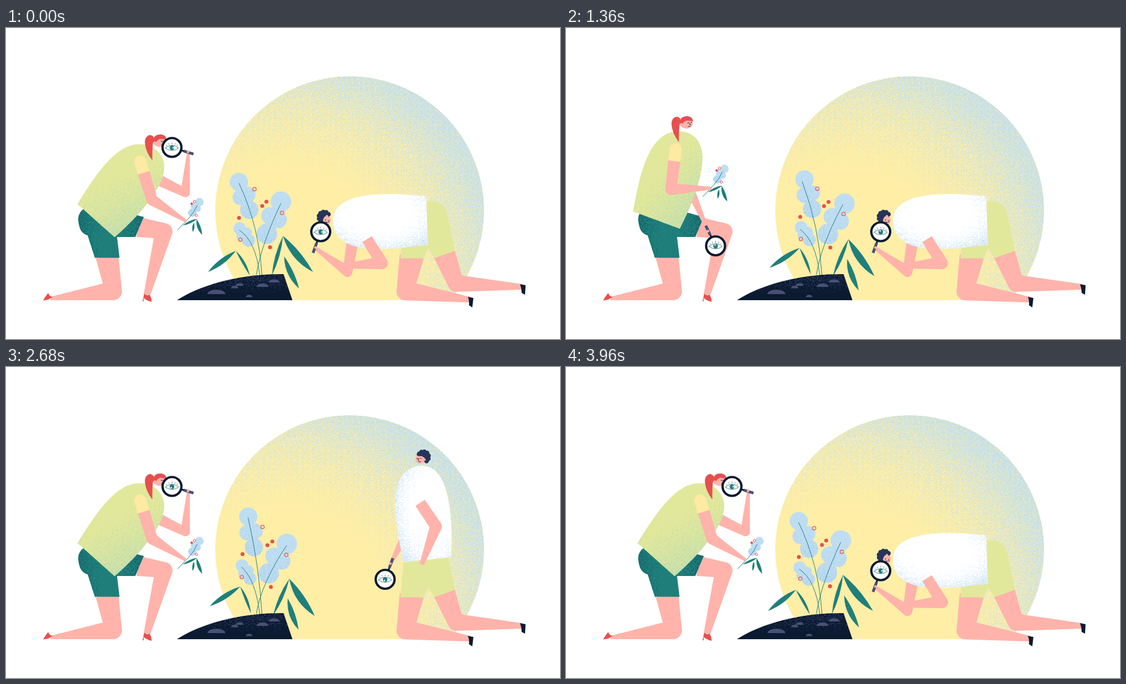
Animation of 998x561 px, one loop 4 s. Source, as an HTML page:

```html
<!DOCTYPE html>
<html lang="en">
<head>
<meta charset="utf-8">
<title>Field study</title>
<style>
html, body { margin: 0; width: 100%; height: 100%; overflow: hidden; background: #fff; }
svg { position: absolute; left: 0; top: 0; width: 100%; height: 100%; display: block; }
#back { will-change: transform; }
</style>
</head>
<body>
<svg id="back" viewBox="0 0 998 561"><defs id="defs"></defs></svg>
<svg id="stage" viewBox="0 0 998 561"></svg>
<script>
const NS = 'http://www.w3.org/2000/svg';
const SKIN = '#ffb3ab', TEAL = '#1f7f7b', NAVY = '#0a1a30', RED = '#e74f4f';
const LIME = '#e2e89b', PALE = '#c0def2', SLATE = '#4a5075', HAIR = '#26345a';
const $ = id => document.getElementById(id);
const back = $('back'), stage = $('stage'), defs = $('defs');

// Vectors
const plus = (a, b, k = 1) => [a[0] + b[0] * k, a[1] + b[1] * k];
const lerp = (a, b, p) => [a[0] + (b[0] - a[0]) * p, a[1] + (b[1] - a[1]) * p];
const unit = (a, b) => {
  const d = Math.hypot(b[0] - a[0], b[1] - a[1]) || 1;
  return [(b[0] - a[0]) / d, (b[1] - a[1]) / d];
};
const turn = ([x, y], k = 1) => [-y * k, x * k];
const polar = deg => [Math.cos(deg * Math.PI / 180), Math.sin(deg * Math.PI / 180)];
const spin = ([x, y], [cx, cy], deg) => {
  const [c, s] = polar(deg);
  return [cx + (x - cx) * c - (y - cy) * s, cy + (x - cx) * s + (y - cy) * c];
};
// Straight move bowed sideways, furthest off halfway
const swing = (a, b, bow, p) => plus(lerp(a, b, p), bow, 4 * p * (1 - p));
const xy = ([x, y]) => x.toFixed(2) + ' ' + y.toFixed(2);

// Drawing
function add(parent, tag, attrs = {}, html = '') {
  const el = document.createElementNS(NS, tag);
  for (const k in attrs) el.setAttribute(k, attrs[k]);
  if (html) el.innerHTML = html;
  parent.appendChild(el);
  return el;
}
const group = (parent = stage) => add(parent, 'g');
const path = (parent, d, fill, more) => add(parent, 'path', { d, fill, ...more });
const stroke = (parent, d, color, width) =>
  path(parent, d, 'none', { stroke: color, 'stroke-width': width, 'stroke-linecap': 'round' });
const disc = ([x, y], r) => `M${xy([x - r, y])}a${r} ${r} 0 1 0 ${2 * r} 0a${r} ${r} 0 1 0 ${-2 * r} 0Z`;
const setPath = (d, ...els) => els.forEach(el => el.setAttribute('d', d));
const place = (el, p) => el.setAttribute('transform', `translate(${xy(p)})`);
const rotate = (el, deg, pivot) => el.setAttribute('transform', `rotate(${deg.toFixed(2)} ${xy(pivot)})`);

// Speckle: gradient alpha plus noise, cut and filled with one colour
function speckle(name, color, tag, attrs, stops) {
  add(defs, tag, { id: name, ...attrs }, stops.map(([o, a]) =>
    `<stop offset="${o}" stop-opacity="${a}"/>`).join(''));
  add(defs, 'filter', { id: name + 'Grain', x: 0, y: 0, width: 1, height: 1, 'color-interpolation-filters': 'sRGB' }, `
    <feTurbulence type="fractalNoise" baseFrequency=".9" numOctaves="2" seed="4"/>
    <feColorMatrix values="0 0 0 0 0  0 0 0 0 0  0 0 0 0 0  3 0 0 0 -1" result="n"/>
    <feComposite in="SourceGraphic" in2="n" operator="arithmetic" k2="1" k3="1" k4="-1"/>
    <feComponentTransfer result="m"><feFuncA type="linear" slope="3"/></feComponentTransfer>
    <feFlood flood-color="${color}"/>
    <feComposite in2="m" operator="in"/>`);
}
function grainy(parent, d, fill, name) {
  return [path(parent, d, fill), path(parent, d, `url(#${name})`, { filter: `url(#${name}Grain)` })];
}
const down = { x1: 0, y1: 0, x2: 0, y2: 1 };
speckle('sky', '#c3dfec', 'radialGradient',
  { gradientUnits: 'userSpaceOnUse', cx: 500, cy: 440, r: 430 }, [[.42, 0], [.7, .5], [.92, 1]]);
speckle('rock', '#414874', 'linearGradient', down, [[0, .45], [.35, .3], [.85, 0]]);
speckle('blouse', '#bddcb0', 'linearGradient', { x1: .2, y1: .2, x2: .8, y2: 1 }, [[0, 0], [.3, .15], [1, 1]]);
speckle('pants', '#0f5760', 'linearGradient', { x1: 0, y1: 0, x2: 1, y2: 0 }, [[0, .55], [.4, .05], [.6, .1], [1, .6]]);
speckle('tee', '#c6e0f4', 'radialGradient', { cx: .65, cy: .45, r: .7 }, [[.45, 0], [.75, .3], [1, .8]]);
speckle('petal', '#a4cbe8', 'linearGradient', down, [[0, .05], [.5, .25], [1, .55]]);

// Bent limb: flat ends, round outer joint. Sizes are half widths
function limb(s, e, h, [top, joint, end]) {
  const u = unit(s, e), v = unit(e, h);
  const side = u[0] * v[1] - u[1] * v[0] > 0 ? 1 : -1;
  const n = turn(u, side), m = turn(v, side);
  const mid = unit([0, 0], plus(n, m));
  const reach = Math.min(2.2, 1 / (mid[0] * n[0] + mid[1] * n[1]));
  const line = [plus(s, n, top), plus(e, mid, joint * reach), plus(h, m, end), plus(h, m, -end), plus(e, m, -joint)];
  return `M${line.map(xy).join('L')}A${joint} ${joint} 0 0 ${side > 0 ? 0 : 1} ${xy(plus(e, n, -joint))}L${xy(plus(s, n, -top))}Z`;
}
const UPPER = 51.5, FORE = 73;
function elbow(s, h, side) {
  const u = unit(s, h);
  const d = Math.min(Math.hypot(h[0] - s[0], h[1] - s[1]), UPPER + FORE);
  const a = (UPPER ** 2 - FORE ** 2 + d * d) / (2 * d);
  return plus(plus(s, u, a), turn(u, side), Math.sqrt(Math.max(0, UPPER ** 2 - a * a)));
}
const arm = (s, h, side, size) => limb(s, elbow(s, h, side), h, size);

function leaf(a, b, width, bend = 0) {
  const n = turn(unit(a, b)), mid = lerp(a, b, .5);
  return `M${xy(a)}Q${xy(plus(mid, n, bend + width))} ${xy(b)}Q${xy(plus(mid, n, bend - width))} ${xy(a)}Z`;
}
// Petals: one round at each end, a pair side by side between
function petals(a, b, r) {
  const n = turn(unit(a, b)), mid = lerp(a, b, .5), small = r * .84;
  return disc(a, r) + disc(b, r) + disc(plus(mid, n, r * .45), small) + disc(plus(mid, n, -r * .45), small);
}

// Sun
const sun = 'M439 491A242 242 0 1 1 799 491Z';
grainy(back, sun, '#feeea6', 'sky');

// Plant: stems bend more the higher they are, leaves tip from the root
const updates = [];
const ROOT = [458, 445];
const sway = (t, low) => (1 - Math.cos((t - low) / 1000 * Math.PI)) / 2;
const bend = ([x, y], s) => {
  const k = .0007 * (ROOT[1] - y) * s;
  return [x + k * (ROOT[1] - y), y + 2 * k * (x - ROOT[0])];
};
const tip = ([x, y], s) => {
  const h = ROOT[1] - y;
  return [x + (3 + .16 * h) * s, y + (.11 + .0015 * h) * (x - ROOT[0]) * s];
};
function flower(a, b, r, foot, knee) {
  const els = grainy(stage, '', PALE, 'petal');
  const stem = stroke(stage, '', TEAL, 1);
  const head = plus(a, [-1, 3]);
  updates.push(t => {
    const s = sway(t, 1890), q = sway(t, 1800);
    setPath(petals(bend(a, s), bend(b, s), r), ...els);
    setPath(`M${xy(foot)}Q${xy(knee)} ${xy(bend(head, q))}`, stem);
  });
}
function berry(at, hollow) {
  const el = hollow ? stroke(stage, disc([0, 0], 3.2), RED, 1.2) : path(stage, disc([0, 0], 3.5), RED);
  updates.push(t => place(el, bend(at, sway(t, 1800))));
}
function frond(a, b, width, curve) {
  const el = path(stage, '', TEAL);
  updates.push(t => {
    const s = sway(t, 1980);
    setPath(leaf(tip(a, s), tip(b, s), width, curve), el);
  });
}
flower([419, 278], [438, 328], 16.5, [461, 445], [456, 358]);
flower([495, 313], [470, 371], 18.5, [451, 445], [460, 390]);
flower([421, 362], [437, 383], 11.5, [457, 445], [450, 384]);
[[446, 291], [496.5, 333], [422, 382]].forEach(p => berry(p, true));
[[468, 313], [460.5, 321], [419, 343], [475.5, 395.5]].forEach(p => berry(p));
frond([414, 402], [364, 440], 9);
frond([414, 402], [439, 446], 5, -3);
frond([499, 375], [553, 440], 13, 5);
frond([499, 375], [479, 446], 7);
frond([501, 412], [528, 470], 10, 4);

// Rock
grainy(stage, 'M308 491C346 466 416 443 500 444L516 491Z', NAVY, 'rock');
for (const [x, y, r] of [[379, 480, 16], [412, 469.5, 6.5], [421, 465, 7], [462, 467, 11], [438, 485.5, 6], [483, 459, 10]])
  path(stage, `M${x - r} ${y}A${r} ${2 + r * .38} 0 0 1 ${x + r} ${y}Z`, SLATE);

function glass() {
  const g = group();
  const handle = add(g, 'g', {}, `
    <path d="M18 0H24" stroke="${NAVY}" stroke-width="3"/>
    <path d="M22 0H40.5" stroke="${SLATE}" stroke-width="5"/>
    <ellipse cx="30" cy="-1" rx="2.2" ry="2.6" fill="${SKIN}"/>`);
  add(g, 'circle', { r: 17, fill: '#fff', stroke: NAVY, 'stroke-width': 4.2 });
  stroke(g, 'M-12 1Q0-9 12 1Q0 10-12 1Z', '#3e6e7c', .9);
  for (let a = -150; a <= -30; a += 30) {
    const [x, y] = polar(a);
    stroke(g, `M${xy([x * 10, y * 6])}L${xy([x * 12, y * 8.5])}`, '#3e6e7c', .8);
  }
  path(g, disc([0, .5], 4.2), TEAL);
  const glint = path(g, disc([0, 0], 1.4), '#fff');
  return (at, deg, t) => {
    place(g, at);
    rotate(handle, deg, [0, 0]);
    place(glint, plus([0, .5], polar(t * .18), 2.3));
  };
}
const grip = (at, deg) => plus(at, polar(deg), 31);

// Woman
function woman() {
  const HIP = [160, 345];
  path(stage, limb([182, 412], [193, 475], [80, 488], [20.5, 16, 3]), SKIN);
  path(stage, 'M67 491.500L70 486L76 478Q78 484 84 485L76 490Z', RED);
  path(stage, limb([238, 359], [285, 367], [254, 481], [18, 15, 6]), SKIN);
  path(stage, 'M249 479Q254 484 258 481Q263 487 262 494Q254 492 248 487V493H246Z', RED);
  grainy(stage, 'M140 326Q127 336 131 353Q134 371 147 374L160 414.500H204.500L200 377H233L248 341L190 325Z', TEAL, 'pants');
  const far = path(stage, '', SKIN), torso = group();
  grainy(torso, 'M121 331C133 260 150 187 203 186C233 187 246 208 246 237Q244 285 205 362Z', LIME, 'blouse');

  const sprig = group();
  grainy(sprig, petals([22, -34], [9, -15], 7.5), PALE, 'petal');
  stroke(sprig, 'M-17 16L2-4Q13-16 18-28M-4 6Q6-2 17-3', TEAL, 1);
  path(sprig, leaf([17, -3], [-8, 8], 4) + leaf([17, -3], [27, 25], 6, 2) + leaf([12, 3], [10, 20], 4), TEAL);
  path(sprig, disc([8, -31], 2.2), RED);
  stroke(sprig, disc([13, -35], 2.2) + disc([16.5, -10], 2.2), RED, 1);

  const near = path(stage, '', SKIN), sleeve = path(stage, '', '#feeaa2'), head = group();
  add(head, 'ellipse', { cy: 2, rx: 11.5, ry: 9.5, fill: SKIN });
  path(head, 'M-12 3Q-13-11 2-11Q11-10 12-2L1-3Q-6-2-8 7Q-12 6-12 3ZM-27 3Q-27-8-18-10Q-11-9-11-4Q-14 8-13.500 36Q-26 20-27 3Z', RED);
  path(head, disc([-9, 4], 2.5), SKIN);
  stroke(head, 'M2 1.500L5 1M8 .5L10 0M6 2L7.500 4.500H5.500M3 7.500Q5 8.500 7 7.500', NAVY, .9);
  const lens = glass();

  // p: 0 leaning, 1 upright
  return (p, t) => {
    const tilt = 21.5 * (1 - p);
    rotate(torso, tilt, HIP);
    place(head, spin([217, 170], HIP, tilt));
    const at = swing([299, 215.5], [269.5, 393], [86, -34], p), deg = 17 + 227 * p;
    lens(at, deg, t);
    setPath(arm(lerp([277, 275], [203, 246], p), grip(at, deg), 1, [10, 8, 2.5]), far);

    const s = lerp([248, 261], [195, 240], p), h = lerp([325, 349], [262, 289], p);
    setPath(arm(s, h, 1, [11, 10, 2.5]), near);
    const u = unit(s, elbow(s, h, 1)), n = turn(u), top = plus(s, u, -21);
    setPath(`M${xy(plus(s, n, 11))}L${xy(plus(top, n, 11))}A11 11 0 0 1 ${xy(plus(top, n, -11))}L${xy(plus(s, n, -11))}Z`, sleeve);
    place(sprig, plus(h, [1.5, -1]));
  };
}

// Man
function man() {
  const HIP = [758.5, 347.5];
  path(stage, limb([789, 406], [811, 461], [929, 467], [20, 15, 5]), SKIN);
  path(stage, 'M926 462L936 464L935 481L929 478Q929 470 926 462Z', NAVY);
  path(stage, limb([731, 412], [720, 475], [835, 490], [22, 16.5, 5]), SKIN);
  path(stage, 'M832 485L842 487L840 504L834 500Q835 492 832 485Z', NAVY);
  path(stage, 'M716 352L757 314Q791 308 797 343L808.500 402L772 415L761 398L752 415.500H710.500Z', LIME);
  const far = path(stage, '', SKIN), torso = group();
  grainy(torso, 'M802 343C805 270 800 180 750 178C715 178 701 210 701 245C701 290 712 325 715 352Z', '#fff', 'tee');
  const near = path(stage, '', SKIN), head = group();
  add(head, 'ellipse', { cx: 747, cy: 166, rx: 9.5, ry: 8.5, fill: SKIN });
  path(head, 'M739 159Q749 150 760 156L761 168L756 171L753 163L749 161Z', HAIR);
  for (let a = -145; a <= 55; a += 33)
    path(head, disc(plus([752, 162], polar(a), 9.3), 4.2), HAIR);
  path(head, disc([754, 167], 2.2), SKIN);
  stroke(head, 'M740 165L742 165M746 164.500L748 165M743.500 165L742 168H744M743 171Q745 172 747 170.500', NAVY, .9);
  const lens = glass();

  // p: 0 on all fours, 1 upright
  return (p, t) => {
    const q = 1 - p, tilt = -86 * q;
    rotate(torso, tilt, HIP);
    rotate(head, tilt, HIP);
    const shoulder = (at, slip) => plus(spin(at, HIP, tilt), slip, q);
    const at = swing([567, 367.5], [683, 383], [-84, -26], p), deg = 110 - 180 * p;
    lens(at, deg, t);
    setPath(arm(shoulder([735, 238], [-24, 26]), grip(at, deg), -1, [10.5, 9, 3]), far);
    const hand = swing([605, 430], [749, 356], [-39, -17], p);
    setPath(arm(shoulder([746, 245], [-5, 28]), hand, -1, [10, 10.5, 4]), near);
  };
}

const poseWoman = woman(), poseMan = man();
const LOOP = 4000;
function ease(t, start, length) {
  const x = Math.min(1, Math.max(0, (t - start) / length));
  return x * x * (3 - 2 * x);
}
function draw(t) {
  updates.forEach(update => update(t));
  poseWoman(ease(t, 0, 580) - ease(t, 1900, 600), t);
  poseMan(ease(t, 1530, 580) - ease(t, 3400, 540), t);
}
const start = performance.now();
function tick() {
  draw((performance.now() - start) % LOOP);
  requestAnimationFrame(tick);
}
tick();
</script>
</body>
</html>
```
